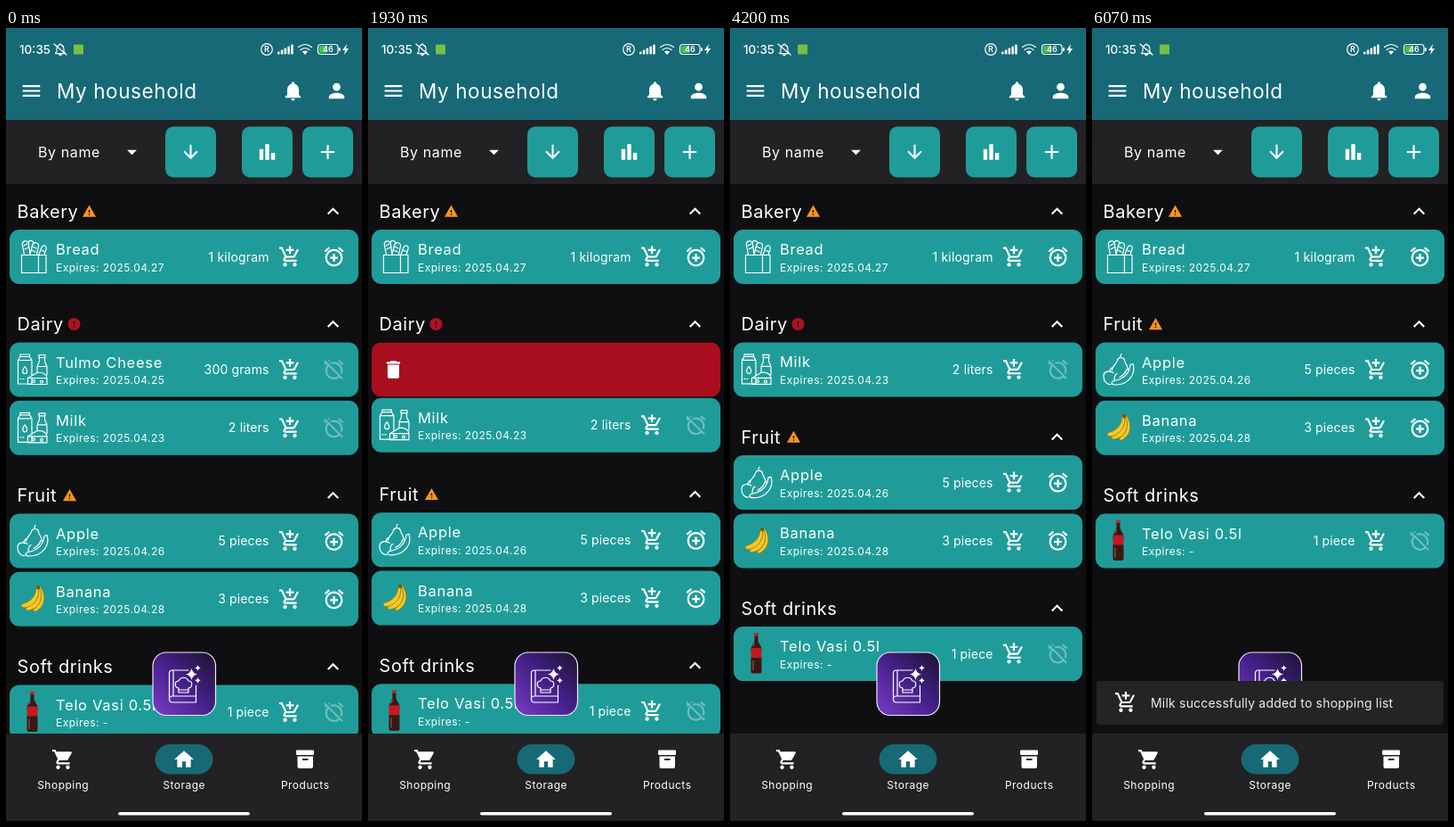
Write an HTML page that moves like this. It is 400 px wide and 889 px high and loops after 6.14 s.

```html
<!DOCTYPE html>
<html lang="en">
<head>
<meta charset="utf-8">
<title>My household</title>
<style>
html, body { margin: 0; width: 100%; height: 100%; overflow: hidden; background: #0f0e10; }
svg { display: block; width: 400px; height: 889px; font-family: Inter, sans-serif; fill: #fff; }
.title { font-size: 22.5px; letter-spacing: .6px; }
.head { font-size: 20px; letter-spacing: .55px; }
.name { font-size: 16.5px; letter-spacing: .7px; }
.sub { font-size: 12px; letter-spacing: .47px; }
.qty { font-size: 14px; letter-spacing: .15px; text-anchor: end; }
.sort { font-size: 16px; letter-spacing: .6px; }
.tab { font-size: 12px; letter-spacing: .5px; text-anchor: middle; }
.snack { font-size: 14px; letter-spacing: .2px; fill: #ececec; }
.clock { font-size: 13.5px; font-weight: 500; }
.line { fill: none; stroke: #fff; stroke-width: 1.2; stroke-linecap: round; stroke-linejoin: round; }
</style>
</head>
<body>
<svg id="stage" viewBox="0 0 400 889"></svg>
<script>
const LOOP = 6140, TEAL = '#1f9c99', BAR = '#176977';

const icons = {
  bell: 'M12 22c1.1 0 2-.9 2-2h-4c0 1.1.89 2 2 2zm6-6v-5c0-3.07-1.64-5.64-4.5-6.32V4c0-.83-.67-1.5-1.5-1.5s-1.5.67-1.5 1.5v.68C7.63 5.36 6 7.92 6 11v5l-2 2v1h16v-1l-2-2z',
  person: 'M12 12c2.21 0 4-1.79 4-4s-1.79-4-4-4-4 1.79-4 4 1.79 4 4 4zm0 2c-2.67 0-8 1.34-8 4v2h16v-2c0-2.66-5.33-4-8-4z',
  menu: 'M3 18h18v-2H3v2zm0-5h18v-2H3v2zm0-7v2h18V6H3z',
  down: 'M20 12l-1.41-1.41L13 16.17V4h-2v12.17l-5.58-5.59L4 12l8 8 8-8z',
  chart: 'M4 9h4v11H4zm12 4h4v7h-4zm-6-9h4v16h-4z',
  plus: 'M19 13h-6v6h-2v-6H5v-2h6V5h2v6h6v2z',
  drop: 'M7 10l5 5 5-5z',
  less: 'M12 8l-6 6 1.41 1.41L12 10.83l4.59 4.58L18 14z',
  cartAdd: 'M11 9h2V6h3V4h-3V1h-2v3H8v2h3v3zm-4 9c-1.1 0-1.99.9-1.99 2S5.9 22 7 22s2-.9 2-2-.9-2-2-2zm10 0c-1.1 0-1.99.9-1.99 2s.89 2 1.99 2 2-.9 2-2-.9-2-2-2zm-9.83-3.25l.03-.12.9-1.63h7.45c.75 0 1.41-.41 1.75-1.03l3.86-7.01L19.42 4h-.01l-1.1 2-2.76 5H8.53l-.13-.27L6.16 6l-.95-2-.94-2H1v2h2l3.6 7.59-1.35 2.45c-.16.28-.25.61-.25.96 0 1.1.9 2 2 2h12v-2H7.42c-.13 0-.25-.11-.25-.25z',
  cart: 'M7 18c-1.1 0-1.99.9-1.99 2S5.9 22 7 22s2-.9 2-2-.9-2-2-2zM1 2v2h2l3.6 7.59-1.35 2.45c-.16.28-.25.61-.25.96 0 1.1.9 2 2 2h12v-2H7.42c-.14 0-.25-.11-.25-.25l.03-.12.9-1.63h7.45c.75 0 1.41-.41 1.75-1.03l3.58-6.49c.08-.14.12-.31.12-.48 0-.55-.45-1-1-1H5.21l-.94-2H1zm16 16c-1.1 0-1.99.9-1.99 2s.89 2 1.99 2 2-.9 2-2-.9-2-2-2z',
  alarmAdd: 'M7.88 3.39L6.6 1.86 2 5.71l1.29 1.53 4.59-3.85zM22 5.72l-4.6-3.86-1.29 1.53 4.6 3.86L22 5.72zM12 4c-4.97 0-9 4.03-9 9s4.02 9 9 9c4.97 0 9-4.03 9-9s-4.03-9-9-9zm0 16c-3.87 0-7-3.13-7-7s3.13-7 7-7 7 3.13 7 7-3.13 7-7 7zm1-11h-2v3H8v2h3v3h2v-3h3v-2h-3V9z',
  alarmOff: 'M12 6c3.87 0 7 3.13 7 7 0 .84-.16 1.65-.43 2.4l1.52 1.52c.58-1.19.91-2.51.91-3.92 0-4.97-4.03-9-9-9-1.41 0-2.73.33-3.92.91L9.6 6.43C10.35 6.16 11.16 6 12 6zm10-.28l-4.6-3.86-1.29 1.53 4.6 3.86L22 5.72zM2.92 2.29L1.65 3.57 2.98 4.9l-1.11.93 1.42 1.42 1.11-.94.8.8C3.83 8.69 3 10.75 3 13c0 4.97 4.02 9 9 9 2.25 0 4.31-.83 5.89-2.2l2.2 2.2 1.27-1.27L3.89 3.27l-.97-.98zm13.55 16.1C15.26 19.39 13.7 20 12 20c-3.87 0-7-3.13-7-7 0-1.7.61-3.26 1.61-4.47l9.86 9.86zM8.02 3.28L6.6 1.86l-.86.71 1.42 1.42.86-.71z',
  trash: 'M6 19c0 1.1.9 2 2 2h8c1.1 0 2-.9 2-2V7H6v12zM19 4h-3.5l-1-1h-5l-1 1H5v2h14V4z',
  warn: 'M1 21h22L12 2 1 21zm12-3h-2v-2h2v2zm0-4h-2v-4h2v4z',
  error: 'M12 2C6.48 2 2 6.48 2 12s4.48 10 10 10 10-4.48 10-10S17.52 2 12 2zm1 15h-2v-2h2v2zm0-4h-2V7h2v6z',
  home: 'M10 20v-6h4v6h5v-8h3L12 3 2 12h3v8z'
};

const icon = (name, x, y, scale = 1.09, attrs = '') =>
  `<path d="${icons[name]}" transform="translate(${x} ${y}) scale(${scale}) translate(-12 -12)" ${attrs}/>`;
const text = (cls, x, y, s) => `<text class="${cls}" x="${x}" y="${y}">${s}</text>`;
const rect = (x, y, w, h, r, attrs = '') =>
  `<rect x="${x}" y="${y}" width="${w}" height="${h}" rx="${r}" ${attrs}/>`;
const line = (d, attrs = '') => `<path class="line" d="${d}" ${attrs}/>`;
const star = (x, y, r) => {
  const k = r * .16;
  return `<path d="M${x} ${y - r}Q${x + k} ${y - k} ${x + r} ${y}Q${x + k} ${y + k} ${x} ${y + r}Q${x - k} ${y + k} ${x - r} ${y}Q${x - k} ${y - k} ${x} ${y - r}z"/>`;
};

// Product pictures, in card coordinates
const art = {
  bread: line('M17.5 28.5h19v20h-19zM36.5 28.5h8.5v20h-8.5M20.500 28l-2-10c-1-6 6-7 7-2l1.500 12M27 28l2.500-10c1-5 8-4 7 1l-2 9M37 28l3-8c2-4 6-2 5 2l-2 6.500M20 18l4-2M21 22l4-2M30 19l4 2M29 23l4 2M39 23l4 1.500M25 15c1-4 6-3 6 1'),
  dairy: line('M13.5 20v26.5h15.500v-6M29 37v-17h-15.500l2.500-4h10.500l2.500 4M16 16v-2.500h10.500v2.500M21.200 27c-4 5-2.500 8 0 8s4-3 0-8zM16 41h1M19 41h1M37 14h7v3h-7zM37.500 17v3.500c0 3-2.500 4-2.500 8v5M43.500 17v3.500c0 3 2.500 4 2.500 8v8M35 27h11M24.500 40l11-6.500c6 0 10 2 10.500 6.500zM24.500 40v7h21.500v-7') +
    '<g class="line"><circle cx="31" cy="43.500" r="1.500"/><circle cx="40" cy="44" r="1.500"/></g>',
  fruit: line('M24 34c-4-3-11-2-11 4 0 6 4 9.500 8 9M20 33c0-3 1-4 3-5M22.500 31c0-5 5-6 6-11 1-4 7-4 8 0 .5 4 4 6 4 11M32 17c0-2 0-3 1-4M43 25l3-1c4 12-6 24-20 23.500-4 0-6-3-1-4.500 10-2 17-7 18-18zM25 42c0-4 1-6 3-7M31 39c4-2 7-5 8-9'),
  banana: '<g fill="#f3c928" stroke="#967516" stroke-width=".7"><path d="M34 17c0 8-4 16-16 19-2 2 0 4 3 4 10 0 17-10 16-23z"/><path d="M36 17c3 9-2 19-13 23-2 2 0 4 3 3 11-2 17-13 12-26z"/><path d="M37 17c5 9 3 19-6 25-1 2 1 3 3 2 9-5 12-16 5-27z"/></g><path d="M34 15.500h3.500l1 4h-4z" fill="#6b5a1c"/>',
  bottle: '<path d="M27.500 8h4v7c0 4 4 6 4 11l-.5 5 .5 6v13q0 2.500-2 2.500h-8q-2 0-2-2.500v-13l.5-6-.5-5c0-5 4-7 4-11z" fill="#3b1714"/>' +
    rect(27, 7, 5, 3.5, 1, 'fill="#c9222b"') + rect(23.8, 24, 11.400, 11, 1, 'fill="#c71722"') +
    '<path d="M26 38v11M27.500 18l-1.500 4" stroke="#a5655c" fill="none"/>'
};

const card = (id, name, date, qty, pic, alarm) => `<g id="${id}">` +
  rect(4, 0, 392, 61, 11, `fill="${TEAL}"`) + art[pic] +
  text('name', 56, 28, name) + text('sub', 56, 46.7, 'Expires: ' + date) + text('qty', 295.6, 35.5, qty) +
  icon('cartAdd', 319, 30.5) +
  (alarm ? icon('alarmAdd', 368.5, 30.5) : icon('alarmOff', 368.5, 30.5, 1.09, 'opacity=".36"')) + '</g>';

const at = (y, body) => `<g transform="translate(0 ${y})">${body}</g>`;
const head = (name, badge = '') => text('head', 12.5, 7, name) + badge + icon('less', 367.5, 0);
const warn = x => icon('warn', x, 0, .69, 'fill="#f7941d"');
const swipe = (id, color, mark) =>
  `<clipPath id="${id}Clip"><rect id="${id}Win" y="0" height="61"/></clipPath>` +
  `<g id="${id}"><g clip-path="url(#${id}Clip)">${rect(4, 0, 392, 61, 11, `id="${id}Box" fill="${color}"`)}${mark}</g></g>`;

const button = (x, name, scale) => rect(x, 110.5, 57, 57, 9, `fill="${TEAL}"`) + icon(name, x + 28.5, 139, scale);

const status = text('clock', 15, 29, '10:35') +
  icon('bell', 61, 24, .66, 'fill="none" stroke="#fff" stroke-width="1.700"') + line('M54 18l14 12') +
  rect(76, 18.5, 11, 11, 1, 'fill="#76c043"') +
  '<circle class="line" cx="293" cy="24" r="6.300"/><text x="293" y="27.300" font-size="9" font-weight="600" text-anchor="middle">R</text>' +
  [0, 1, 2, 3, 4].map(i => rect(305 + i * 3.8, 26.5 - i * 2, 2.5, 3 + i * 2, .8)).join('') +
  line('M328.500 21.500q7.500-6 15 0M331 24.500q5-4 10 0', 'stroke-width="2"') + '<path d="M333 26.500q3-2 6 0l-3 3.500z"/>' +
  rect(350.5, 18.5, 22.5, 11, 3.2, 'class="line"') + rect(352, 20, 9, 8, 1.6, 'fill="#45c34a"') +
  rect(374, 22, 1.8, 4, .8) +
  '<text x="362" y="27.300" font-size="9" font-weight="600" text-anchor="middle">46</text>' +
  '<path d="M383 18l-5 7h3l-1 5 5-7h-3z"/>';

const fab = rect(165, 700, 70.5, 70.5, 15, 'fill="url(#purple)" stroke="#efe8f8" stroke-width="1.200"') +
  line('M205 720h-18q-3.500 0-3.500 3.500v29q0 3.500 3.500 3.500h26.500v-19M183.500 752q0-3 3.500-3h26.500M188 720v29', 'stroke-width="1.500"') +
  line('M194 745v-5c-5-1-5-8 0-8 2-5 9-5 11 0 5 0 5 7 0 8v5zM194 742h11', 'stroke-width="1.500"') +
  star(208.5, 724.5, 6.5) + star(215.5, 717.5, 3.2) + star(215.5, 731.5, 3.2);

const nav = rect(0, 791, 400, 98, 0, 'fill="#222123"') + rect(167.5, 803, 65, 33.5, 16.7, `fill="${BAR}"`) +
  icon('cart', 64, 820) + icon('home', 200, 820) +
  rect(326, 809.5, 20, 5.5, 1) + '<path fill-rule="evenodd" d="M327.500 816.500h17.500v11.500q0 2-2 2h-13.500q-2 0-2-2zM333 819v2h6.500v-2z"/>' +
  text('tab', 64.2, 853, 'Shopping') + text('tab', 200.2, 853, 'Storage') + text('tab', 336.2, 853, 'Products') +
  rect(126, 879, 148, 3.6, 1.8);

const $ = id => document.getElementById(id);

$('stage').innerHTML = `<defs>
  <linearGradient id="purple" x1="0" y1="1" x2="1" y2="0"><stop stop-color="#7a3cc6"/><stop offset=".5" stop-color="#45218a"/><stop offset="1" stop-color="#1c1230"/></linearGradient>
  <clipPath id="listClip"><rect y="175" width="400" height="616"/></clipPath>
  <clipPath id="snackClip"><rect id="snackWin" width="400"/></clipPath></defs>` +
  rect(0, 0, 400, 889, 0, 'fill="#0f0e10"') +
  '<g clip-path="url(#listClip)">' +
  at(205.5, head('Bakery', warn(93.5))) + at(226, card('bread', 'Bread', '2025.04.27', '1 kilogram', 'bread', true)) +
  '<g id="dairy">' + at(332, head('Dairy', icon('error', 76.5, 0, .7, 'fill="#ae1122"'))) +
  at(352.5, swipe('remove', '#a80e1e', icon('trash', 28.5, 30.5)) + card('cheese', 'Tulmo Cheese', '2025.04.25', '300 grams', 'dairy')) +
  '<g id="milkRow">' + swipe('buy', '#0a9405', icon('cartAdd', 371, 30.5)) + card('milk', 'Milk', '2025.04.23', '2 liters', 'dairy') + '</g></g>' +
  '<g id="rest">' + at(524, head('Fruit', warn(71.5))) +
  at(544.5, card('apple', 'Apple', '2025.04.26', '5 pieces', 'fruit', true)) +
  at(609.8, card('banana', 'Banana', '2025.04.28', '3 pieces', 'banana', true)) +
  at(716, head('Soft drinks')) + at(736.5, card('soda', 'Telo Vasi 0.5l', '-', '1 piece', 'bottle')) + '</g></g>' +
  rect(0, 0, 400, 103, 0, `fill="${BAR}"`) + status +
  icon('menu', 28.5, 70.5) + text('title', 57, 78.5, 'My household') + icon('bell', 322.5, 70.5) + icon('person', 371.5, 70.5) +
  rect(0, 103, 400, 72, 0, 'fill="#222123"') + text('sort', 36, 145, 'By name') + icon('drop', 141.5, 139) +
  button(179, 'down', 1.02) + button(265, 'chart') + button(333, 'plus') +
  fab + nav +
  '<g id="snack" clip-path="url(#snackClip)">' + rect(5, 732, 390, 49, 4, 'fill="#242325"') +
  icon('cartAdd', 38, 756) + text('snack', 66, 761.7, 'Milk successfully added to shopping list') + '</g>';

$('cheese').insertAdjacentHTML('beforeend', rect(4, 0, 392, 61, 11, 'id="press" opacity="0"'));

const clamp = u => Math.min(1, Math.max(0, u));
const smooth = u => (u = clamp(u), u * u * (3 - 2 * u));
const quart = u => (u = clamp(u), u < .5 ? 8 * u ** 4 : 1 - 8 * (1 - u) ** 4);
// cubic-bezier(.25, .1, .25, 1)
function ease(u) {
  u = clamp(u);
  let lo = 0, hi = 1;
  for (let i = 0; i < 24; i++) {
    const s = (lo + hi) / 2;
    if (.75 * s * (1 - s) + s ** 3 < u) lo = s; else hi = s;
  }
  return .3 * lo * (1 - lo) ** 2 + 3 * lo * lo * (1 - lo) + lo ** 3;
}

const show = (id, on) => $(id).setAttribute('visibility', on ? 'visible' : 'hidden');
const move = (id, x, y) => $(id).setAttribute('transform', `translate(${x.toFixed(2)} ${y.toFixed(2)})`);

function reveal(id, dx, shrink) {
  const h = Math.max(0, Math.min(61, 64 - shrink)), win = $(id + 'Win');
  show(id, dx !== 0 && h > 0);
  win.setAttribute('x', dx < 0 ? 396 + dx : 4);
  win.setAttribute('width', Math.abs(dx));
  win.setAttribute('height', h);
  $(id + 'Box').setAttribute('height', h);
}

function draw(t) {
  const out = 392 * smooth((t - 1308) / 470);
  const back = -392 * smooth((t - 4990) / 470);
  const shut = (t < 2400 ? 64.7 : 65.4) * ease((t - 1919) / 185);
  const lag = 65.4 * ease((t - 1925) / 185);
  const shut2 = 65.4 * ease((t - 5600) / 180);
  const gone = t >= 5780;

  move('cheese', out, 0);
  show('cheese', t < 1788);
  $('press').setAttribute('opacity', .07 * smooth((t - 1250) / 120));
  reveal('remove', out, shut);

  move('milkRow', 0, 417.8 - shut);
  move('milk', back, 0);
  $('milk').setAttribute('display', t < 5500 ? 'inline' : 'none');
  reveal('buy', back, shut2);

  $('dairy').setAttribute('display', gone ? 'none' : 'inline');
  move('rest', 0, gone ? -192 : -lag - shut2);

  const rise = quart((t - 5790) / 250);
  $('snackWin').setAttribute('y', 781 - 49 * rise);
  $('snackWin').setAttribute('height', 49 * rise);
  $('snack').setAttribute('opacity', clamp((t - 5830) / 180));
}

const start = performance.now();
function tick() {
  draw((performance.now() - start) % LOOP);
  requestAnimationFrame(tick);
}
tick();
</script>
</body>
</html>
```
